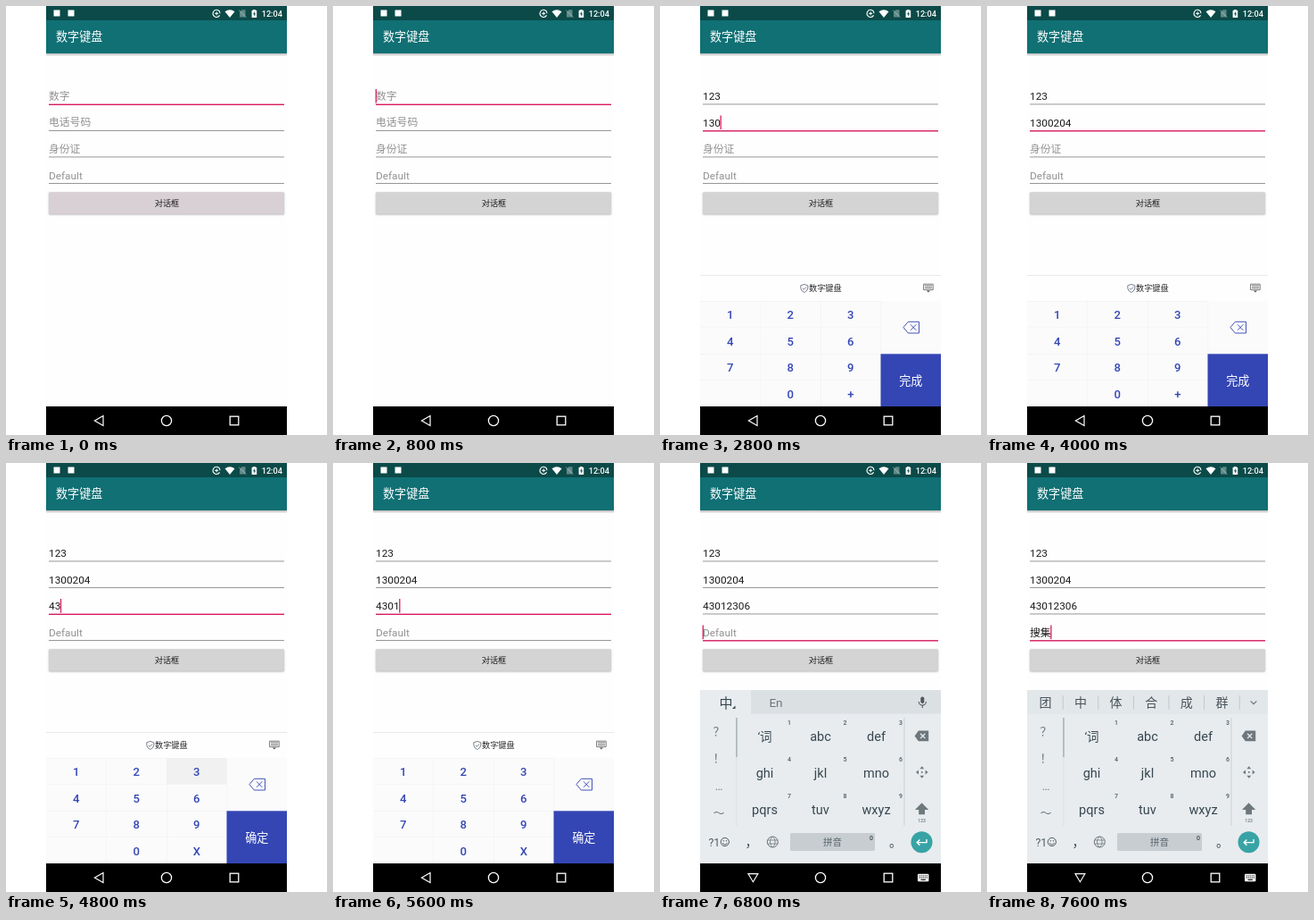
These frames come from a looping animation (360 px wide and 480 px high, 8 s). An HTML page with a canvas:

```html
<!DOCTYPE html>
<html lang="zh-CN">
<head>
<meta charset="utf-8">
<title>数字键盘</title>
<style>
  html, body { margin: 0; width: 100%; height: 100%; overflow: hidden; background: #fff; }
  canvas { display: block; width: 360px; height: 480px; }
</style>
</head>
<body>
<canvas id="stage"></canvas>
<script>
const canvas = document.getElementById('stage');
const ctx = canvas.getContext('2d');
const ratio = window.devicePixelRatio || 1;
canvas.width = 360 * ratio;
canvas.height = 480 * ratio;
ctx.scale(ratio, ratio);

const FONT = 'Roboto, "Noto Sans CJK SC", "Noto Sans CJK", sans-serif';
const PINK = '#d81b60', BLUE = '#3446b4', SLATE = '#37474f', GREY = '#6d777c';
const STEP = 400;
const HINTS = ['数字', '电话号码', '身份证', 'Default'];

// One entry per step: focused field, its text, caret shown, keyboard
const STEPS = [
  [0, '', 0, ''], [0, '', 0, ''], [0, '', 1, ''], [0, '', 1, 'num'],
  [0, '1', 1, 'num'], [0, '123', 1, 'num'],
  [1, '', 1, 'tel'], [1, '130', 1, 'tel'], [1, '1300', 1, 'tel'],
  [1, '13002', 1, 'tel'], [1, '1300204', 0, 'tel'],
  [2, '', 1, 'id'], [2, '43', 1, 'id', '3'], [2, '430', 1, 'id'],
  [2, '4301', 1, 'id'], [2, '430123', 1, 'id'], [2, '43012306', 0, 'id'],
  [3, '', 1, 'ime'], [3, 'sou ji', 1, 'ime', '搜集 手机 收集'], [3, '搜集', 1, 'ime', '团中体合成群']
];
const PADS = {
  num: { keys: ['.', '0', '00'], done: '完成' },
  tel: { keys: ['', '0', '+'], done: '完成' },
  id: { keys: ['', '0', 'X'], done: '确定' }
};

function rect(x, y, w, h, color) {
  ctx.fillStyle = color;
  ctx.fillRect(x, y, w, h);
}

function round(x, y, w, h, r, color) {
  ctx.fillStyle = color;
  ctx.beginPath();
  ctx.roundRect(x, y, w, h, r);
  ctx.fill();
}

function text(str, x, y, size, color, align = 'center', weight = 400) {
  ctx.font = `${weight} ${size}px ${FONT}`;
  ctx.textAlign = align;
  ctx.fillStyle = color;
  ctx.fillText(str, x, y);
}

function trace(d, color, width) {
  const path = new Path2D(d);
  if (width) {
    ctx.lineWidth = width;
    ctx.strokeStyle = color;
    ctx.stroke(path);
  } else {
    ctx.fillStyle = color;
    ctx.fill(path);
  }
}

function ring(x, y, r, color, width) {
  ctx.beginPath();
  ctx.arc(x, y, r, 0, Math.PI * 2);
  if (width) {
    ctx.lineWidth = width;
    ctx.strokeStyle = color;
    ctx.stroke();
  } else {
    ctx.fillStyle = color;
    ctx.fill();
  }
}

function drawBars() {
  rect(45, 0, 270, 16, '#0b4a48');
  rect(45, 16, 270, 37, '#107074');
  const shade = ctx.createLinearGradient(0, 53, 0, 56.5);
  shade.addColorStop(0, 'rgba(0,0,0,.28)');
  shade.addColorStop(1, 'rgba(0,0,0,0)');
  rect(45, 53, 270, 3.5, shade);
  text('数字键盘', 56, 39, 13.1, '#fff', 'left', 500);

  rect(53.5, 4.5, 7, 7, '#fff');
  rect(69.5, 4.5, 7, 7, '#fff');
  trace('M237.5 4.6A4 4 0 1 0 239.6 10.4M240 8.2A4 4 0 0 0 237.5 4.6', '#fff', 1.1);
  trace('M234.2 8.4h4M236.2 6.4v4', '#fff', 1);
  trace('M245.5 6.2Q251 2.2 256.5 6.2L251 13Z', '#fff');
  trace('M262 7L264.5 4.3H268.5V12.5H262Z', 'rgba(255,255,255,.35)');
  trace('M261 4.5L269.5 12.8', 'rgba(255,255,255,.5)', .8);
  rect(277.2, 4, 2.4, 1.2, '#fff');
  round(275.6, 4.8, 5.6, 8.2, .6, '#fff');
  trace('M278.8 6L277 9.3H278.3V11.8L280.1 8.5H278.8Z', '#0b4a48');
  text('12:04', 310, 11.8, 9.2, '#fff', 'right', 500);
}

function drawField(i, value, focused, caret, composing) {
  const y = 105 + i * 29.5;
  if (value) text(value, 48, y, 11.8, '#1c1c1c', 'left');
  else text(HINTS[i], 48, y - (i < 3 ? .3 : 0), 11.8, '#929292', 'left');
  ctx.font = `400 11.8px ${FONT}`;
  const width = ctx.measureText(value).width;
  if (composing) rect(48, y + 1.6, width, .7, '#1c1c1c');
  if (focused) rect(48, y + 4.6, 264, 1.4, PINK);
  else rect(48, y + 4.5, 264, .9, '#8c8c8c');
  if (caret) rect(47.6 + width, y - 12, 1.3, 15.6, PINK);
}

function drawButton(color) {
  ctx.save();
  ctx.shadowColor = 'rgba(0,0,0,.3)';
  ctx.shadowBlur = 2 * ratio;
  ctx.shadowOffsetY = .8 * ratio;
  round(48, 208.3, 264, 24.4, 1.3, color);
  ctx.restore();
  text('对话框', 180.5, 223.8, 9.2, '#1c1c1c', 'center', 500);
}

function drawNav(ime) {
  rect(45, 448, 270, 32, '#000');
  trace(ime ? 'M99 459.7H109.8L104.4 468.7Z' : 'M109 458.6V469.4L99.4 464Z', '#fff', 1.2);
  ring(180, 464, 5.6, '#fff', 1.3);
  ctx.strokeRect(251.2, 459.2, 9.6, 9.6);
  if (!ime) return;
  round(289, 459.8, 12.4, 8.4, 1, '#fff');
  for (let i = 0; i < 5; i++) {
    rect(290.4 + i * 2.1, 461.3, 1.1, 1.1, '#000');
    rect(290.4 + i * 2.1, 463.4, 1.1, 1.1, '#000');
  }
  rect(292.5, 465.7, 5.4, 1.1, '#000');
}

function drawPad({ keys, done }, pressed) {
  rect(45, 301, 270, 29, '#fefefe');
  rect(45, 301, 270, .8, '#e4e4e4');
  text('数字键盘', 167, 319.4, 9.2, '#2a2a2a', 'left');
  trace('M161.8 311.4L165.8 312.8V315.7Q165.6 318.8 161.8 320.5Q158 318.8 157.8 315.7V312.8Z', '#566070', .8);
  trace('M159.9 315.8L161.4 317.3L164 314.4', '#566070', .8);
  trace('M295.6 311.2H306.2V317.6H295.6Z', '#555', .8);
  trace('M297 313.1H305M297 315.4H305', '#555', .9);
  trace('M298.9 318.6H303L300.9 320.6Z', '#555');

  rect(45, 330, 270, 118, '#fbfbfc');
  [...'123456789', ...keys].forEach((key, i) => {
    const x = 45 + i % 3 * 67.5, y = 330 + Math.floor(i / 3) * 29.5;
    if (key && key === pressed) rect(x, y, 67.5, 29.5, '#f1f1f2');
    text(key, x + 33.8, y + 20, 13.1, BLUE, 'center', 500);
  });
  for (let i = 0; i < 4; i++) {
    rect(45, 330 + i * 29.5, 202.5, .6, '#f1f1f2');
    if (i) rect(45 + i * 67.5, 330, .6, 118, '#f1f1f2');
  }
  trace('M278.3 353.3H290.5V366H278.3L273 359.6Z', '#4353b8', 1);
  trace('M281 356.4L287.3 362.8M287.3 356.4L281 362.8', '#4353b8', 1);
  rect(247.5, 389.3, 67.5, 58.7, BLUE);
  text(done, 281.3, 423.8, 13.1, '#fff');
}

function drawStrip(words) {
  if (!words) {
    rect(45, 254, 270, 26.5, '#dbe0e3');
    rect(45, 254, 57, 27, '#e8ecef');
    text('中', 74, 273.5, 15, SLATE);
    trace('M84.5 271.5V275H81Z', SLATE);
    text('En', 130, 273, 13.5, GREY);
    round(292.3, 261.6, 4, 7.4, 2, '#4f595e');
    trace('M290.2 267A4.1 4.1 0 0 0 298.4 267M294.3 271V274', '#4f595e', 1.1);
    return;
  }
  rect(45, 254, 270, 27, '#e2e7ea');
  const list = words.includes(' ') ? words.split(' ') : [...words];
  const gap = 237.6 / list.length;
  list.forEach((word, i) => {
    text(word, 45.6 + gap * (i + .5), 273, 14, '#48545a');
    rect(45.2 + gap * (i + 1), 260, .8, 16, '#b9c1c5');
  });
  trace('M295.6 266.3L299 269.7L302.4 266.3', GREY, 1.2);
}

function drawIme(words) {
  rect(45, 254, 270, 194, '#e8ecef');
  drawStrip(words);

  [...'?!…~'].forEach((mark, i) => {
    const glyph = { '?': '？', '!': '！', '~': '～' }[mark] || mark;
    text(glyph, 66, [305, 335, 366, 396][i], 13, GREY);
  });
  rect(85.4, 285, 1.1, 44, '#8d979c');
  rect(85.6, 329, .7, 77, '#d3d9dc');
  rect(273.6, 285, .8, 121, '#c3cace');

  ['‘词', 'abc', 'def', 'ghi', 'jkl', 'mno', 'pqrs', 'tuv', 'wxyz'].forEach((key, i) => {
    const x = i % 3 * 62.5, y = Math.floor(i / 3) * 41;
    text(key, 117.5 + x, 310.8 + y, i ? 14.5 : 13.5, SLATE);
    text(i + 1, 145 + x, 293.2 + y, 7, '#4f5b61', 'center', 500);
  });

  trace('M289.8 299.6H301.2V311.2H289.8L285.6 305.4Z', GREY);
  trace('M292 302.8L297.3 308.1M297.3 302.8L292 308.1', '#e8ecef', 1.3);
  for (let i = 0; i < 4; i++) {
    ctx.save();
    ctx.translate(293.8, 346);
    ctx.rotate(i * Math.PI / 2);
    trace('M0 -6.8L2.4 -3.8H-2.4Z', GREY);
    ctx.restore();
  }
  ring(293.8, 346, 1, GREY);
  trace('M293.6 380.2L301.2 388H297V393.2H290.2V388H286Z', GREY);
  text('123', 293.6, 402, 5, GREY, 'center', 500);

  text('?1', 54.5, 428.6, 12.3, '#4f5b61', 'left');
  ring(72.8, 424, 4.6, '#4f5b61', 1);
  ring(71.2, 422.8, .7, '#4f5b61');
  ring(74.4, 422.8, .7, '#4f5b61');
  trace('M70.2 425A2.7 2.7 0 0 0 75.4 425', '#4f5b61', .9);
  text('，', 102.5, 428.5, 14, SLATE);
  ring(126.3, 424, 6, GREY, 1);
  trace('M120.5 422H132.1M120.5 426H132.1M126.3 418C122.6 421 122.6 427 126.3 430C130 427 130 421 126.3 418', GREY, .8);
  round(146, 414, 95, 20, 1.5, '#c7cdd1');
  text('拼音', 193.5, 428, 10.5, '#586369');
  text('0', 237, 421.8, 7, SLATE, 'center', 500);
  text('。', 264, 429, 14, SLATE);
  ring(293.5, 424.2, 12, '#38a3a5');
  trace('M299 421V424.6H288.4M291.4 421.4L288.2 424.6L291.4 427.8', '#fff', 1.4);
}

// Last text typed in each field before the given step
function valuesAt(step) {
  const values = ['', '', '', ''];
  for (let i = 0; i <= step; i++) values[STEPS[i][0]] = STEPS[i][1];
  return values;
}

function draw(step) {
  const [focus, value, caret, board, extra] = STEPS[step];
  rect(0, 0, 360, 480, '#fff');
  rect(45, 0, 270, 480, '#fefefe');
  drawBars();
  valuesAt(step).forEach((v, i) => {
    const active = i === focus;
    drawField(i, v, active, active && caret, active && value === 'sou ji');
  });
  drawButton(step ? '#d4d4d4' : '#d8d0d4');
  if (board === 'ime') drawIme(extra);
  else if (board) drawPad(PADS[board], extra);
  drawNav(board === 'ime');
}

function tick() {
  draw(Math.floor(performance.now() / STEP) % STEPS.length);
  requestAnimationFrame(tick);
}
tick();
</script>
</body>
</html>
```
